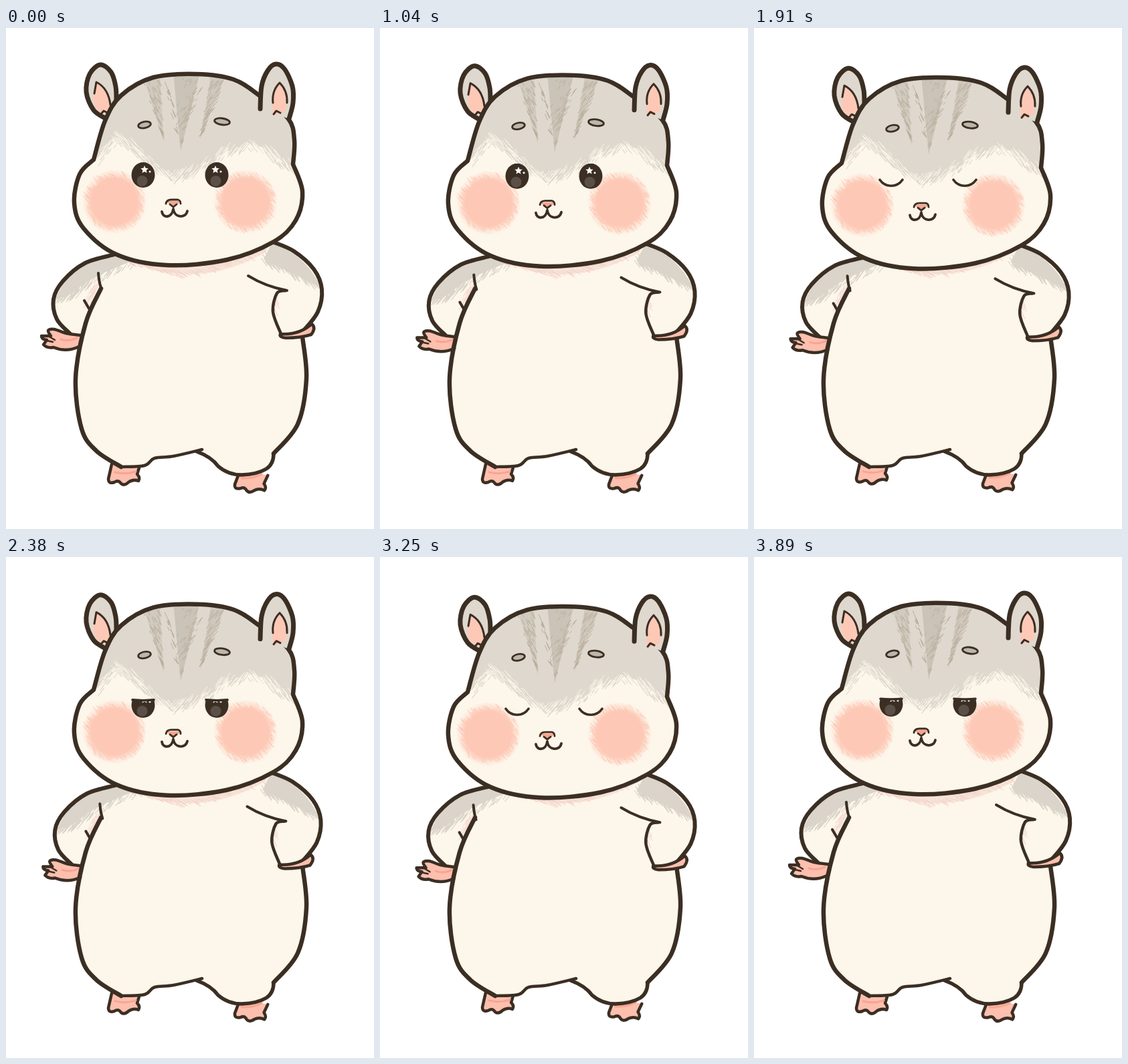
An HTML page for the animation above (4.22 s loop, 550x750 px).

```html
<!DOCTYPE html>
<html lang="en">
<head>
<meta charset="utf-8">
<title>Hamster</title>
<style>
  html, body { margin: 0; width: 100%; height: 100%; overflow: hidden; background: #fff; }
  svg { display: block; width: 550px; height: 750px; }
</style>
</head>
<body>
<svg id="stage" viewBox="0 0 550 750"></svg>
<script>
const INK = '#3b2e23', CREAM = '#fdf6ea', GREY = '#dfd8ce', STRIPE = '#c6bfb2',
      TAUPE = '#b9ae9b', PINK = '#fdc9b6', SKIN = '#fdbfae', BLUSH = '#f6dcd2', ROSE = '#f9a491';

let seed = 11;
const rnd = () => (seed = seed * 16807 % 2147483647) / 2147483647;
const mix = (a, b, t) => a + (b - a) * t;
const f = n => n.toFixed(1);

function points(text) {
  const n = text.split(' ').map(Number);
  return Array.from({ length: n.length / 2 }, (_, i) => [n[2 * i], n[2 * i + 1]]);
}

// Smooth curve through a few key points
function smooth(text, start = 'M') {
  const p = points(text), at = i => p[Math.max(0, Math.min(p.length - 1, i))];
  let d = start + p[0];
  for (let i = 0; i < p.length - 1; i++) {
    const [a, b, c, e] = [at(i - 1), at(i), at(i + 1), at(i + 2)];
    d += `C${f(b[0] + (c[0] - a[0]) / 6)} ${f(b[1] + (c[1] - a[1]) / 6)} ` +
         `${f(c[0] - (e[0] - b[0]) / 6)} ${f(c[1] - (e[1] - b[1]) / 6)} ${c}`;
  }
  return d;
}

const fill = (d, c, more = '') => `<path d="${d}" fill="${c}" ${more}/>`;
const line = (d, w, c = INK, more = '') =>
  `<path d="${d}" fill="none" stroke="${c}" stroke-width="${w}" stroke-linecap="round" stroke-linejoin="round" ${more}/>`;
const shape = (d, c, w) => fill(d, c) + line(d, w);
const group = (id, body, more = '') => `<g id="${id}" ${more}>${body}</g>`;

// Short pencil strokes centred on random places
function hatch(n, place, dx, dy, c, w = 1.2) {
  let d = '';
  for (let i = 0; i < n; i++) {
    const [x, y] = place(), k = 0.5 + rnd();
    d += `M${f(x - dx * k / 2)} ${f(y - dy * k / 2)}l${f(dx * k)} ${f(dy * k)}`;
  }
  return line(d, w, c);
}
const along = (text, spread) => {
  const p = points(text);
  return () => {
    const i = Math.floor(rnd() * (p.length - 1)), t = rnd();
    return [0, 1].map(k => mix(p[i][k], p[i + 1][k], t) + (rnd() - .5) * spread);
  };
};
const wedge = (l, r, top, tx, ty) => () => {
  const v = rnd() * .9;
  return [mix(mix(l, r, rnd()), tx, v), mix(top, ty, v)];
};
const ring = (x, y, r0, r1) => () => {
  const a = rnd() * 2 * Math.PI, r = mix(r0, r1, rnd());
  return [x + r * Math.cos(a), y + r * Math.sin(a)];
};

// Head
const headLine = smooth('131 197 148 139 172 101 220 74 285 69 340 77 380 102 422 136 431 168 429 204') +
  smooth('429 204 443 245 433 288 400 320 330 347 240 355 165 339 116 300 102 262 110 219 131 197', 'L') + 'Z';

const edgeL = '164 164 185 172 205 189 225 209 250 222', edgeR = '250 222 276 217 302 202 330 185 364 174',
      sideL = '132 196 164 164', sideR = '364 174 390 181 410 198 434 210';

function fringe(edge, lean, n) {
  return hatch(n, along(edge, 15), lean, 9, GREY) + hatch(n / 2, along(edge, 13), lean, 9, CREAM, 1);
}
function stripe(l, r, top, tx, ty, n, lean, tone) {
  return fill(`M${l} ${top}H${r}L${tx} ${ty}Z`, STRIPE, `opacity="${tone}"`) +
    hatch(n, wedge(l, r, top + 8, tx, ty), lean, 6, TAUPE, 1);
}
const fur = group('fur',
  fill(smooth(`${sideL} ${edgeL} ${edgeR} ${sideR}`) + 'V40H120V200Z', GREY) +
  fringe(sideL, -7, 40) + fringe(edgeL, 8, 110) + fringe(edgeR, -7, 110) + fringe(sideR, 7, 70) +
  stripe(205, 230, 72, 236, 172, 55, 3, .55) +
  stripe(250, 290, 66, 261, 184, 30, -4, .8) +
  stripe(306, 328, 72, 290, 167, 60, -5, .6) +
  hatch(22, along('240 84 257 160', 6), 3, 7, TAUPE, 1) +
  hatch(24, along('288 88 266 150', 9), -5, 6, TAUPE, 1),
  'clip-path="url(#headClip)"');

const cheek = (x, y) => `<circle cx="${x}" cy="${y}" r="48" fill="url(#blush)"/>` +
  hatch(120, ring(x, y, 36, 45), 4, 5, PINK, 1) + hatch(70, ring(x, y, 40, 48), 4, 5, CREAM, 1);

function star(x, y, r) {
  const tips = Array.from({ length: 10 }, (_, i) => {
    const a = Math.PI * (i / 5 - .5), k = i % 2 ? r * .48 : r;
    return f(x + k * Math.cos(a)) + ' ' + f(y + k * Math.sin(a));
  });
  return fill('M' + tips.join('L') + 'Z', '#fff');
}
const eye = (x, shine) =>
  `<ellipse cx="${x}" cy="220" rx="17.5" ry="19" fill="${INK}"/>` +
  `<circle cx="${x - 1.5}" cy="229" r="8" fill="#5b5047"/>` +
  star(shine, 212, 6) + `<circle cx="${shine + 8}" cy="215" r="1.5" fill="#fff"/>`;
const brow = (x, y, rx, turn) =>
  `<ellipse cx="${x}" cy="${y}" rx="${rx}" ry="4.8" transform="rotate(${turn} ${x} ${y})" fill="#bdb6aa" stroke="${INK}" stroke-width="2.8"/>`;

const earL = smooth('150 136 131 123 120 96 125 69 141 55 157 66 164 88 165 110');
const earR = smooth('380 121 382 87 391 64 403 54 416 61 428 87 429 112 423 136');
const innerL = 'M135 81Q154 92 155 118L147 129Q122 120 135 81Z';
const innerR = 'M399 128Q395 94 409 82Q424 100 418 124L404 130Z';

const head = group('head',
  shape(earL, GREY, 7) + fill(innerL, PINK) + line('M132 98L135 81Q153 90 156 115M141 130L146 124L152 127', 3) +
  fill(headLine, CREAM) + fur + cheek(162, 260) + cheek(358, 260) + line(headLine, 6.5) +
  shape(earR, GREY, 7) + fill(innerR, PINK) + line('M399 112Q397 94 409 82Q421 94 420 112M400 129L404 124L410 127', 3) +
  brow(207, 145, 9.5, -12) + brow(323, 140, 11.5, 8) +
  group('eyes', eye(205, 207) + eye(315, 313), 'clip-path="url(#lidClip)"') + line('', 0, INK, 'id="lids"') +
  fill('M240 259H261Q256 266 250 267Q244 265 240 259Z', ROSE) +
  line('M239 263Q240 257 247 257H257Q261 258 261 263M245 264L250 268L255 264', 2.8) +
  line('M233 275C234 285 248 285 250 271C252 285 269 285 271 274', 3.8));

// Body
const sideLeft = smooth('142 390 119 442 104 525 113 600 135 633 172 657');
const sideRight = smooth('400 637 436 593 449 525 443 462');
const under = 'M285 634Q307 642 317 656Q332 669 352 669Q376 668 389 660Q400 653 400 637';
const hem = smooth('172 657 207 655 222 644 250 641 293 631');
const belly = sideLeft + hem.replace('M', 'L') + under.replace('M', 'L') + sideRight.replace('M', 'L') + 'L440 390L404 324L300 310L165 338Z';
const neck = fill('M178 346Q290 400 404 326L300 310Z', BLUSH, 'opacity=".75"') +
  hatch(90, along('182 349 270 371 395 332', 9), 9, 5, '#f4d3c8', 1);

// Arms
const armL = smooth('162 339 118 352 85 379 71 406 76 436 96 458');
const handL = smooth('111 460 90 457 72 451 63 453 67 461') +
  'L53 461Q53 466 61 467L56 474Q62 480 71 478Q90 486 109 477';
const shadeL = fill('M74 406Q95 350 162 342L186 350Q125 372 98 398Z', '#dad4ca') +
  hatch(110, along('78 407 112 388 184 350', 14), -7, 9, '#dad4ca') +
  hatch(24, along('136 380 122 412', 8), -6, 10, BLUSH);

const armR = smooth('398 320 430 334 460 361 472 391 466 425 444 454');
const armRInner = smooth('418 393 405 397 399 425 411 458');
const handR = 'M410 458Q438 460 457 443Q464 449 456 459Q440 464 418 464Q408 463 410 458Z';
const shadeR = fill('M398 321Q448 340 469 386Q430 370 385 346Z', '#dad4ca') +
  hatch(90, along('385 346 425 364 465 386', 12), 6, 8, '#dad4ca') +
  hatch(10, along('405 402 402 425', 5), 4, 8, BLUSH);

// Feet
const toes = 'l-5 22q0 8 9 5q6 -4 10 2q5 4 11 -2q7 -5 15 -2q3 -5 -2 -10l4 -13';
const feet = group('feet', shape('M158 653' + toes, SKIN, 4.5) +
  `<g transform="rotate(8 350 662)">${shape('M350 662' + toes, SKIN, 4.5)}</g>` +
  line('M163 665Q178 669 194 664M352 674Q368 675 382 668', 3, ROSE));

stage.innerHTML = `<defs>
  <clipPath id="headClip"><path d="${headLine}"/></clipPath>
  <clipPath id="lidClip"><path id="lidShape"/></clipPath>
  <radialGradient id="blush"><stop offset=".72" stop-color="${PINK}"/><stop offset="1" stop-color="${PINK}" stop-opacity="0"/></radialGradient>
</defs>` + feet +
  group('armBack', fill(armL + 'L116 458L142 390Z', CREAM)) + fill(belly, CREAM) + neck +
  group('armLeft', shadeL + line(armL, 6) + shape(handL, SKIN, 4.5) +
    line('M63 461L73 467M61 468L70 470', 2.5) + line('M82 466Q94 470 106 464', 3, ROSE) +
    line('M117 408L124 420M138 367Q139 380 142 389', 4)) +
  line(sideLeft + sideRight, 6.5) + line(under, 5.5) + line(hem, 4.5) +
  group('armRight', fill(armR + 'L412 458L400 430L404 396L362 371Z', CREAM) + shadeR +
    line(armR, 6) + line(armRInner, 4.5) + line('M362 371Q388 387 420 393', 4) + shape(handR, SKIN, 4.5)) +
  head;

const el = id => document.getElementById(id);
const move = (id, x, y) => el(id).setAttribute('transform', `translate(${f(x)} ${f(y)})`);

// Pose 0 is the breath in, pose 3 the breath out
function breathe(pose) {
  const b = (1 - Math.cos(Math.PI * pose / 3)) / 2, sway = Math.sin(Math.PI * b), drop = 5 * Math.sqrt(b);
  move('head', 0, 7 * b);
  for (const id of ['armBack', 'armLeft']) move(id, 3.2 * sway - 2 * b ** 4, drop);
  move('armRight', -2.2 * sway, drop);
  move('feet', 0, -2 * b * b);
}

// c runs from 0 (open) to 1 (shut)
function closeEyes(c) {
  const y = Math.min(222, 201 + 28 * c), sag = 12 * c ** 3;
  const curve = (x, w) => `${x - w} ${f(y)}C${x - w / 2} ${f(y + sag)} ${x + w / 2} ${f(y + sag)} ${x + w} ${f(y)}`;
  const w = Math.round(17.5 * Math.sqrt(1 - ((220 - y) / 19) ** 2 || 0));
  el('lidShape').setAttribute('d', [205, 315].map(x => `M${curve(x, 18)}V250H${x - 18}Z`).join(''));
  el('lids').setAttribute('d', [205, 315].map(x => 'M' + curve(x, w)).join(''));
  el('lids').setAttribute('stroke-width', Math.min(3.6, c * 12));
  el('eyes').style.display = c < 1 ? '' : 'none';
}

// Each beat: hold in ms, pose, eye closing
const calm = [[230, 0, 0], [170, 1, 0], [170, 2, 0], [300, 3, 0], [170, 2, 0], [170, 1, 0]];
const blink = rest => [[330, 0, rest], [100, 0, .2], [100, 0, .6], [170, 1, .8], [230, 2, 1], [70, 3, .8], [170, 2, .6], [170, 1, .4]];
const beats = [...calm, ...blink(0), ...blink(.4), [330, 0, .4]];
const loop = beats.reduce((sum, b) => sum + b[0], 0);

const began = performance.now();
let current;
function tick() {
  let t = (performance.now() - began) % loop;
  const beat = beats.find(b => (t -= b[0]) < 0);
  if (beat !== current) {
    current = beat;
    breathe(beat[1]);
    closeEyes(beat[2]);
  }
  requestAnimationFrame(tick);
}
tick();
</script>
</body>
</html>
```
